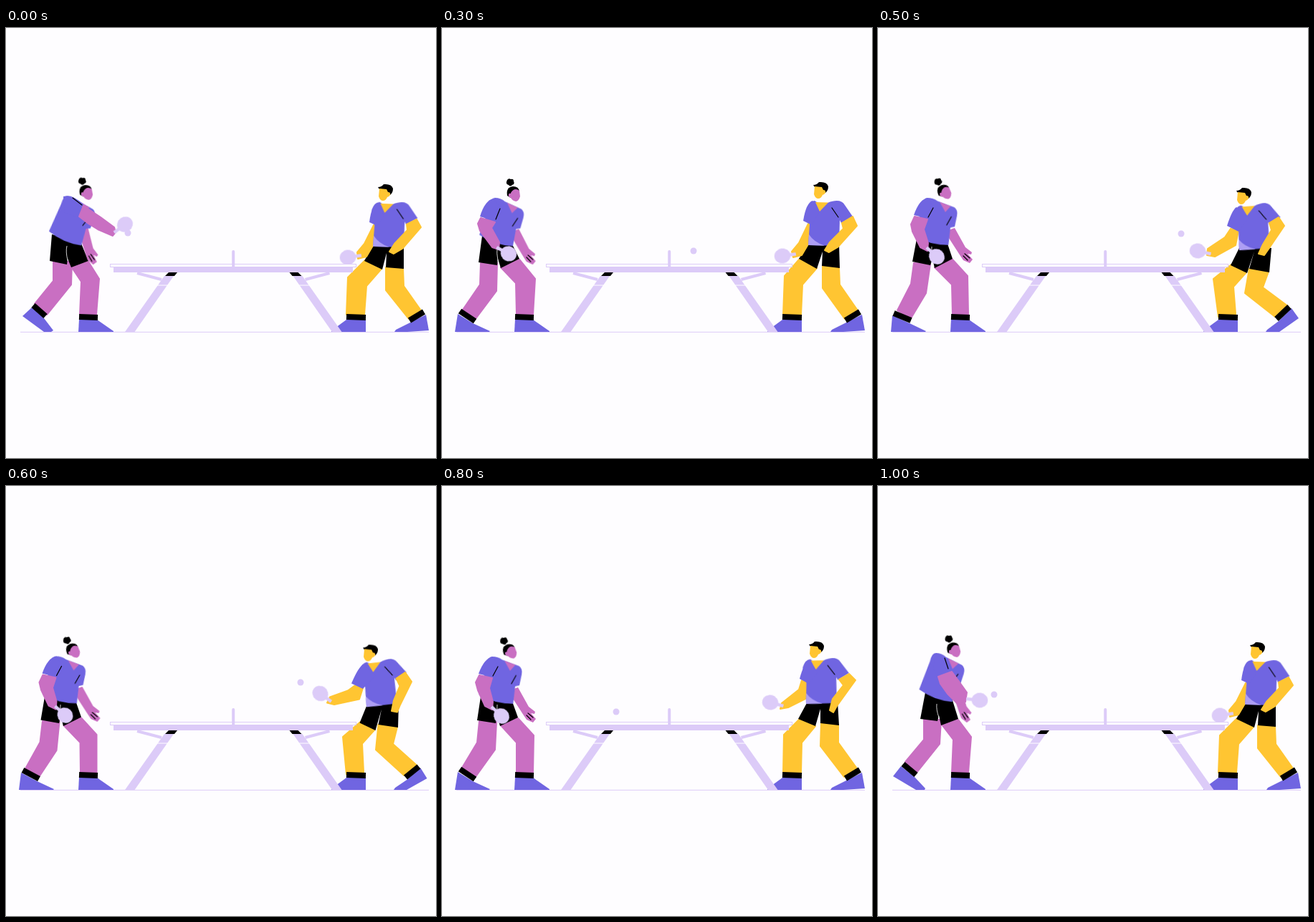
Recreate the animation shown at these times as an HTML page without scripts. Size 600 by 600 pixels, loop 1.1 s.

```html
<!DOCTYPE html>
<html lang="en">
<head>
<meta charset="utf-8">
<title>Table tennis</title>
<style>
html,body{margin:0;width:100%;height:100%;overflow:hidden;background:#fefdff}
svg{display:block;width:100vw;height:100vh}
.a{animation:1.1s steps(2) infinite}
.skin{stroke-width:2;stroke-linejoin:round}
.flat{stroke:none!important}
.pink{fill:#c96fc2;stroke:#c96fc2}
.gold{fill:#ffc532;stroke:#ffc532}
.blue{fill:#7065e1}
.lilac{fill:#dccbf8}
.band{fill:none;stroke:#000;stroke-width:8}
.fold{fill:none;stroke:#000;stroke-width:1.2;stroke-linecap:round}
.seam{fill:none;stroke:#fff;stroke-width:.8}

/* left player */
@keyframes w-back{
0%,to{d:path("M66,326L66,353L40,385L57,400L91,358L92,326Z")}
18.18%{d:path("M58,327L58,356L32,392L49,406L81,362L83,327Z");animation-timing-function:steps(1)}
27.27%{d:path("M54,328L53,358L29,393L46,407L76,367L77,328Z")}
45.45%{d:path("M50,328L46,357L27,394L46,405L67,370L73,329Z")}
63.63%,72.72%{d:path("M52,328L49,358L28,393L46,407L74,368L76,329Z")}
90.9%{d:path("M64,326L64,354L38,385L54,400L86,360L88,326Z");animation-timing-function:steps(1)}}
@keyframes w-front{
0%,to{d:path("M91,333L105,354L103,400L126,400L130,350L115,326Z")}
18.18%{d:path("M87,334L106,355L104,400L127,400L131,351L111,325Z");animation-timing-function:steps(1)}
27.27%{d:path("M82,334L103,356L104,400L127,400L130,350L108,323Z")}
45.45%{d:path("M79,334L103,358L104,400L126,400L125,346L104,323Z")}
63.63%,72.72%{d:path("M82,334L104,358L104,400L127,400L128,348L106,324Z")}
90.9%{d:path("M89,333L105,354L103,400L126,400L130,350L112,326Z");animation-timing-function:steps(1)}}
@keyframes w-band{
0%,to{d:path("M38,387L55,402")}
18.18%{d:path("M27,396L48,408");animation-timing-function:steps(1)}
27.27%{d:path("M25,395L46,409")}
45.45%{d:path("M22,398L46,408")}
63.63%,72.72%{d:path("M25,395L46,409")}
90.9%{d:path("M35,388L53,403");animation-timing-function:steps(1)}}
@keyframes w-foot{
0%,to{d:path("M36,390L53,405L66,422L63,424L53,424L23,402Z")}
18.18%{d:path("M24,401L46,411L67,423L66,424L50,424L18,417Z");animation-timing-function:steps(1)}
27.27%,63.63%,72.72%{d:path("M22,399L43,412L67,423L66,424L50,424L18,424Z")}
45.45%{d:path("M20,401L44,412L67,423L66,424L50,424L18,424Z")}
90.9%{d:path("M32,391L51,406L66,422L65,424L53,424L21,405Z");animation-timing-function:steps(1)}}
@keyframes w-shorts{
0%,to{d:path("M64,288L61,325L85,330L86,322L91,334L115,325L103,296Z")}
18.18%{d:path("M62,289L55,327L81,331L83,322L86,335L112,325L104,299Z");animation-timing-function:steps(1)}
27.27%{d:path("M56,290L51,327L77,331L78,322L82,335L108,322L96,298Z")}
45.45%{d:path("M54,294L48,326L73,331L76,322L79,335L104,322L96,298Z")}
63.63%,72.72%{d:path("M54,294L49,327L75,331L77,322L81,335L106,323L97,298Z")}
90.9%{d:path("M66,288L59,325L83,328L85,320L88,334L112,325L103,296Z");animation-timing-function:steps(1)}}
@keyframes w-seam{
0%,to{d:path("M85,304Q83,312 86,324")}
18.18%{d:path("M81,305Q80,314 83,325");animation-timing-function:steps(1)}
27.27%,63.63%,72.72%{d:path("M77,305Q76,314 78,325")}
45.45%{d:path("M75,305Q74,314 76,325")}
90.9%{d:path("M82,304Q81,312 85,323");animation-timing-function:steps(1)}}
@keyframes w-free{
0%,to{transform:translate(-3px,1px) rotate(15deg)}
18.18%{transform:translate(-1px,2px) rotate(8deg);animation-timing-function:steps(1)}
27.27%{transform:translate(-1px,2px) rotate(2deg)}
45.45%{transform:none}
63.63%,72.72%{transform:translate(-1px,2px)}
90.9%{transform:translate(-1px,1px) rotate(14deg);animation-timing-function:steps(1)}}
@keyframes w-body{
0%,to{transform:translate(0,-3px) rotate(6deg)}
18.18%{transform:none;animation-timing-function:steps(1)}
27.27%{transform:translate(-7px,0) rotate(1deg)}
45.45%{transform:translate(-8px,0) rotate(-3deg)}
63.63%,72.72%{transform:translate(-7px,1px) rotate(-3deg)}
90.9%{transform:translate(-2px,-4px) rotate(3deg);animation-timing-function:steps(1)}}
@keyframes w-head{
0%,to{transform:translate(4px,-3px) rotate(-3deg)}
18.18%{transform:none;animation-timing-function:steps(1)}
27.27%{transform:translate(-8px,-1px)}
45.45%{transform:translate(-15px,-4px) rotate(-15deg)}
63.63%,72.72%{transform:translate(-13px,-2px) rotate(-13deg)}
90.9%{transform:translate(-2px,-4px) rotate(-8deg);animation-timing-function:steps(1)}}
@keyframes w-sleeve{
0%,to{d:path("M80,235Q93,232 108,246L101,264L82,258Z")}
18.18%{d:path("M78,237Q67,239 61,263L83,270L90,250Z");animation-timing-function:steps(1)}
27.27%{d:path("M72,238Q60,240 53,263L75,270L82,252Z")}
45.45%{d:path("M70,237Q58,238 50,261L70,266L77,250Z")}
63.63%,72.72%{d:path("M71,238Q59,240 51,262L71,267L78,251Z")}
90.9%{d:path("M80,235Q95,236 103,258L84,266L77,255Z");animation-timing-function:steps(1)}}
@keyframes w-fold{
0%,to{d:path("M93,237L106,247")}
18.18%{d:path("M89,250L83,266");animation-timing-function:steps(1)}
27.27%{d:path("M81,252L75,267")}
45.45%{d:path("M77,251L70,264")}
63.63%,72.72%{d:path("M78,252L71,265")}
90.9%{d:path("M93,240L98,255");animation-timing-function:steps(1)}}
@keyframes w-arm{
0%,to{d:path("M102,263L115,273L128,281L149,290L153,285L151,278L132,264L108,248Z")}
18.18%{d:path("M63,265L58,273L61,283L93,302L101,300L99,291L79,282L82,271Z");animation-timing-function:steps(1)}
27.27%{d:path("M54,265L50,273L53,283L70,306L79,309L80,299L69,279L74,271Z")}
45.45%{d:path("M51,263L46,274L48,284L59,306L69,311L70,300L64,281L69,267Z")}
63.63%,72.72%{d:path("M52,264L47,274L50,285L60,307L70,312L71,301L66,282L70,268Z")}
90.9%{d:path("M84,266L87,276L97,290L112,305L122,301L124,288L114,274L103,259Z");animation-timing-function:steps(1)}}
@keyframes w-bat{
0%,to{transform:translate(166px,274px) rotate(-37deg)}
18.18%{transform:translate(117px,301px) rotate(8deg);animation-timing-function:steps(1)}
27.27%{transform:translate(93px,315px) rotate(28deg)}
45.45%{transform:translate(82px,319px) rotate(42deg)}
63.63%,72.72%{transform:translate(83px,321px) rotate(43deg)}
90.9%{transform:translate(142px,299px) rotate(6deg);animation-timing-function:steps(1)}}

/* right player */
@keyframes m-front{
0%,90.9%,to{d:path("M501,324L477,348L475,400L500,400L503,360L524,336Z")}
18.18%,27.27%{d:path("M499,322L478,346L476,400L501,400L503,358L523,335Z")}
45.45%{d:path("M493,330L468,350L475,403L499,399L496,361L514,341Z")}
63.63%{d:path("M496,328L472,350L475,402L499,400L498,358L515,339Z");animation-timing-function:steps(1)}
72.72%{d:path("M499,325L477,347L476,400L501,400L502,358L521,335Z")}}
@keyframes m-back{
0%,90.9%,to{d:path("M530,334L530,366L562,406L579,394L555,360L554,335Z")}
18.18%,27.27%{d:path("M531,332L531,363L562,406L580,394L555,358L554,334Z")}
45.45%{d:path("M518,336L512,370L554,403L572,388L537,362L545,340Z")}
63.63%{d:path("M521,330L520,366L557,405L575,392L543,358L547,332Z");animation-timing-function:steps(1)}
72.72%{d:path("M529,331L528,363L561,406L579,394L553,358L553,333Z")}}
@keyframes m-band{
0%,18.18%,27.27%,72.72%,90.9%,to{d:path("M563,408L583,396")}
45.45%{d:path("M556,406L574,389")}
63.63%{d:path("M559,407L578,394");animation-timing-function:steps(1)}}
@keyframes m-foot{
0%,18.18%,27.27%,72.72%,90.9%,to{d:path("M564,411L586,400L590,422L560,424L542,424L544,421Z")}
45.45%{d:path("M559,409L577,391L587,405L560,424L541,424L543,421Z")}
63.63%{d:path("M561,410L580,396L588,411L558,424L541,424L543,421Z");animation-timing-function:steps(1)}}
@keyframes m-shorts{
0%,90.9%,to{d:path("M512,302L500,325L525,337L531,314L530,334L555,336L555,302Z")}
18.18%,27.27%{d:path("M511,301L498,322L523,336L531,312L530,332L555,335L554,301Z")}
45.45%{d:path("M506,303L492,331L515,342L525,312L518,336L546,341L549,307Z")}
63.63%{d:path("M505,299L495,330L516,340L523,311L521,330L548,333L547,300Z");animation-timing-function:steps(1)}
72.72%{d:path("M510,301L497,325L521,335L528,311L528,331L554,334L552,301Z")}}
@keyframes m-arm{
0%,90.9%,to{d:path("M513,275L500,301L490,313L491,322L503,319L513,302L518,276Z")}
18.18%,27.27%{d:path("M511,273L498,300L488,312L490,320L502,317L512,300L516,274Z")}
45.45%{d:path("M492,280L484,292L460,308L459,317L470,319L499,303L503,283Z")}
63.63%{d:path("M481,277L470,279L444,281L437,288L446,291L487,292L493,281Z");animation-timing-function:steps(1)}
72.72%{d:path("M502,271L498,284L474,303L472,311L483,309L509,296L513,275Z")}}
@keyframes m-sleeve{
0%,90.9%,to{d:path("M518,244Q510,247 507,271L518,276L528,262Z")}
18.18%,27.27%{d:path("M517,241Q508,244 504,269L516,275L526,258Z")}
45.45%{d:path("M500,250Q494,254 487,276L503,284L518,264Z")}
63.63%{d:path("M497,247Q489,252 477,275L493,282L514,264Z");animation-timing-function:steps(1)}
72.72%{d:path("M513,243Q505,246 499,269L512,276L524,260Z")}}
@keyframes m-body{
0%,90.9%,to{transform:translate(1px,2px) rotate(.5deg)}
18.18%,27.27%{transform:none}
45.45%{transform:translate(-7px,5px) rotate(-6deg)}
63.63%{transform:translate(-9px,0) rotate(-10deg);animation-timing-function:steps(1)}
72.72%{transform:translate(-3px,0) rotate(-3deg)}}
@keyframes m-head{
0%,90.9%,to{transform:translate(1px,3px)}
18.18%,27.27%{transform:none}
45.45%{transform:translate(-18px,8px)}
63.63%{transform:translate(-22px,5px);animation-timing-function:steps(1)}
72.72%{transform:translate(-6px,2px)}}
@keyframes m-hip-arm{
0%,90.9%,to{d:path("M573,267L579,278L553,308L541,315L535,312L542,301L560,282L559,274Z")}
18.18%,27.27%{d:path("M573,263L579,276L552,306L540,313L534,310L541,299L560,280L558,272Z")}
45.45%{d:path("M559,264L567,276L546,307L539,317L531,315L537,302L549,282L546,272Z")}
63.63%{d:path("M555,256L565,270L554,304L553,314L545,313L545,297L550,276L543,265Z");animation-timing-function:steps(1)}
72.72%{d:path("M568,262L577,271L551,307L546,316L541,313L545,297L560,278L554,270Z")}}
@keyframes m-bat{
0%,90.9%,to{transform:translate(477px,320px) rotate(172deg)}
18.18%,27.27%{transform:translate(475px,318px) rotate(172deg)}
45.45%{transform:translate(446px,311px) rotate(193deg)}
63.63%{transform:translate(431px,268px) rotate(240deg);animation-timing-function:steps(1)}
72.72%{transform:translate(458px,302px) rotate(195deg)}}

@keyframes ball{
0%,to{transform:translate(170px,286px)}
9.09%{transform:translate(243px,282px)}
18.18%{transform:translate(309px,293px)}
27.27%{transform:translate(351px,311px)}
36.36%{transform:translate(388px,318px)}
45.45%{transform:translate(423px,287px)}
54.54%{transform:translate(411px,274px)}
63.63%{transform:translate(327px,285px)}
72.72%{transform:translate(243px,315px)}
81.81%{transform:translate(202px,317px)}
90.9%{transform:translate(162px,291px)}}
</style>
</head>
<body>
<svg viewBox="0 0 600 600">
<defs>
<g id="bat">
  <ellipse rx="11.3" ry="10.4" class="lilac"/>
  <path d="M-9,0H-19" stroke="#dccbf8" stroke-width="4.5"/>
</g>
<g id="stand">
  <path class="lilac" d="M221,346H234L179.500,424H166Z"/>
  <path d="M227,341H239L235,346H222Z"/>
  <path d="M183,342L217,351" stroke="#dccbf8" stroke-width="4"/>
  <path d="M208,359H230" stroke="#fefdff"/>
</g>
</defs>

<path d="M20,424.3H590" stroke="#dccbf8"/>

<g id="left-player">
  <path class="a skin pink" style="animation-name:w-back"/>
  <path class="a blue" style="animation-name:w-foot"/>
  <path class="a band" style="animation-name:w-band"/>
  <path class="a skin pink" style="animation-name:w-front"/>
  <path class="blue" d="M102,407H127L150,423V424H101Z"/>
  <path class="band" d="M102,403L128,404"/>
  <path class="a" style="animation-name:w-shorts"/>
  <path class="a seam" style="animation-name:w-seam"/>
  <g class="a" style="animation-name:w-free;transform-origin:122px 316px">
    <path class="pink flat" d="M93,284L107,279L122,306L131,313L130,316L125,315L132,323L128,328L119,324L113,315Z"/>
    <path class="fold" stroke-width=".8" d="M121,315L128,321M119,318L125,324"/>
  </g>
  <g class="a" style="animation-name:w-body;transform-origin:82px 297px">
    <path class="blue" d="M59,289L72,249Q74,237 80,237Q88,237 94,242L117,252Q122,256 120,264L116,279L110,280L106,304Q80,303 59,289Z"/>
    <path class="pink flat" d="M97,243.500L104,258L112,250Z"/>
    <path class="fold" d="M112,265L105,276"/>
  </g>
  <path class="a blue" style="animation-name:w-sleeve"/>
  <path class="a skin pink" style="animation-name:w-arm"/>
  <path class="a fold" style="animation-name:w-fold"/>
  <g class="a" style="animation-name:w-head;transform-origin:110px 234px">
    <path d="M99,235Q97,223 107,222Q115,222 116,229L104,238Z"/>
    <path d="M99,213Q101,210 104,212Q108,211 108,215Q110,219 106,220Q103,223 101,220Q96,219 99,213Z"/>
    <path class="pink flat" d="M104,231Q109,223 116,228L117,236Q115,243 111,243Q106,242 104,238Q100,237 101,233Q102,231 104,232Z"/>
  </g>
  <use href="#bat" class="a" style="animation-name:w-bat"/>
</g>

<g id="right-player">
  <path class="a skin gold" style="animation-name:m-back"/>
  <path class="a blue" style="animation-name:m-foot"/>
  <path class="a band" style="animation-name:m-band"/>
  <path class="a skin gold" style="animation-name:m-front"/>
  <path class="blue" d="M475,407H502V424H454L456,421Z"/>
  <path class="band" d="M475,403L502,404"/>
  <path class="a" style="animation-name:m-shorts"/>
  <path class="a skin gold" style="animation-name:m-arm"/>
  <g class="a" style="animation-name:m-body;transform-origin:532px 304px">
    <path class="blue" d="M513,274L509,252Q513,241 520,241L526,245L538,244Q556,237 562,247L573,263L557,272L555,268L554,304L511,303Z"/>
    <path fill="#ad9ef4" d="M512,288Q519,299 534,303.800L511,303Z"/>
    <path class="gold flat" d="M521,243L527,256L539,243.500Z"/>
    <path class="fold" d="M544,251L553,264"/>
  </g>
  <path class="a blue" style="animation-name:m-sleeve"/>
  <path class="a skin gold" style="animation-name:m-hip-arm"/>
  <g class="a" style="animation-name:m-head">
    <path d="M518,219Q523,219 526,215Q537,214 539,221Q539,227 535,230L529,224L520,222Z"/>
    <path class="gold flat" d="M520,221L530,222L532,226Q536,226 535,230Q533,233 531,233Q529,238 525,238Q521,238 519,232Z"/>
  </g>
  <use href="#bat" class="a" style="animation-name:m-bat"/>
</g>

<g id="table">
  <rect x="145.500" y="329.500" width="343" height="4" fill="#fff" stroke="#dccbf8"/>
  <rect x="150" y="334" width="334" height="7" class="lilac"/>
  <path d="M317.200,312V334" stroke="#dccbf8" stroke-width="4" stroke-linecap="round"/>
  <use href="#stand"/>
  <use href="#stand" transform="matrix(-1 0 0 1 634.500 0)"/>
</g>

<circle r="4.500" class="a lilac" style="animation-name:ball;animation-timing-function:steps(1)"/>
</svg>
</body>
</html>
```
